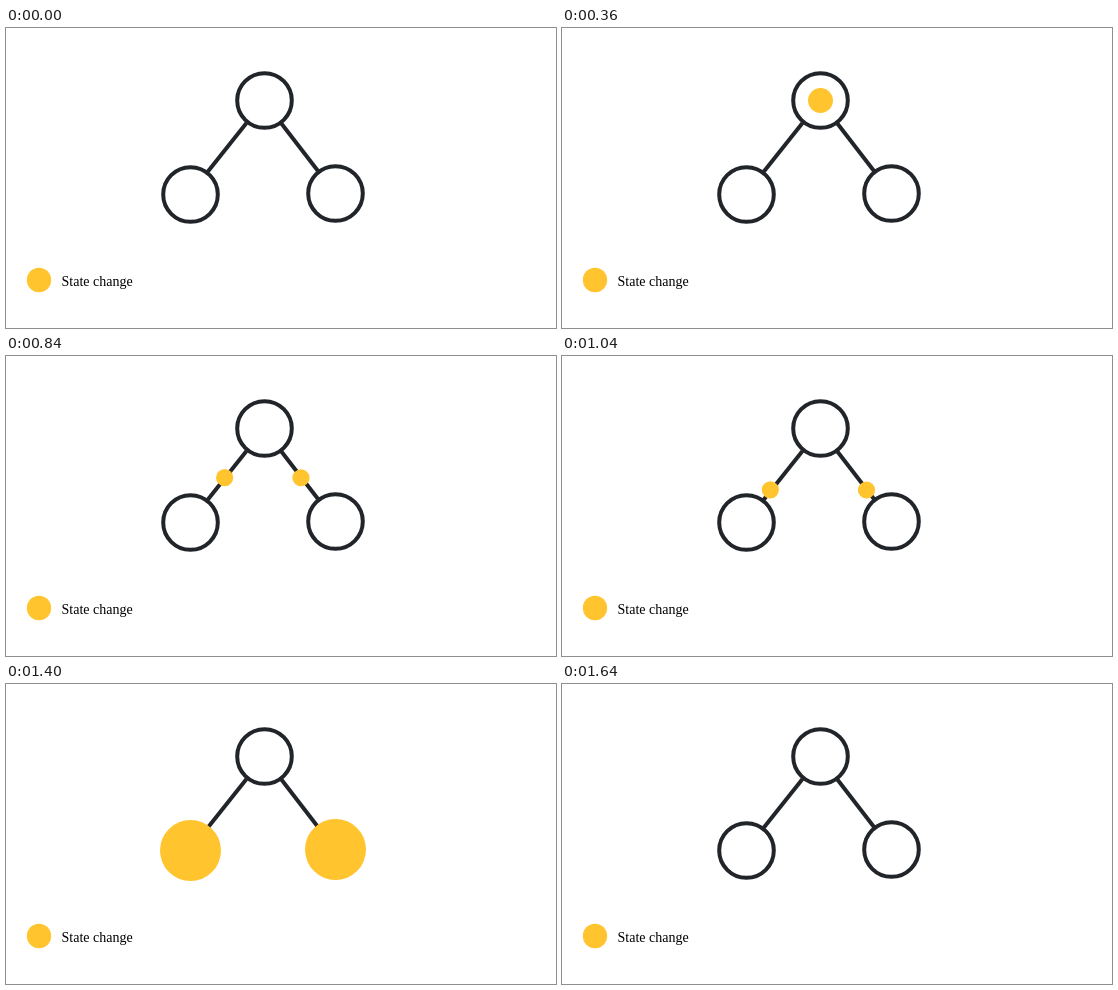
Animation of 550x300 px, one loop 2.28 s. Source, as an HTML page with a canvas:

```html
<!DOCTYPE html>
<html lang="en">
<head>
<meta charset="utf-8">
<title>State change</title>
<style>
  html, body { margin: 0; width: 100%; height: 100%; overflow: hidden; background: #fff; }
  canvas { display: block; }
</style>
</head>
<body>
<canvas id="stage" width="550" height="300"></canvas>
<script>
const ctx = document.getElementById('stage').getContext('2d');
const INK = '#212529';
const YELLOW = '#ffc42e';
const LOOP = 2280, STEP = 40, LAST_STEP = 1640;
const PULSE_RADIUS = 30.5, PULSE_TIME = 480;
const TRAVEL_START = 480, TRAVEL_END = 1120;

const root = { x: 258.5, y: 72.5 };
const leaves = [{ x: 184.5, y: 166.5 }, { x: 329.5, y: 165.5 }];
const edges = [[240.5, 95, 201.5, 144], [275, 95, 312, 143]];
const paths = [[237.2, 99.7, 204.2, 138.7], [277.8, 99.7, 308.3, 138.9]];

function disc(x, y, r) {
  ctx.fillStyle = YELLOW;
  ctx.beginPath();
  ctx.arc(x, y, r, 0, Math.PI * 2);
  ctx.fill();
}

function ring({ x, y }) {
  ctx.beginPath();
  ctx.arc(x, y, 27.3, 0, Math.PI * 2);
  ctx.stroke();
}

// Eased swell from nothing to full size and back
function pulse({ x, y }, elapsed) {
  if (elapsed <= 0 || elapsed >= PULSE_TIME) return;
  const size = (1 - Math.cos(2 * Math.PI * elapsed / PULSE_TIME)) / 2;
  disc(x, y, PULSE_RADIUS * size);
}

function draw(t) {
  ctx.fillStyle = '#fff';
  ctx.fillRect(0, 0, 550, 300);

  ctx.strokeStyle = INK;
  ctx.lineWidth = 4;
  for (const [x1, y1, x2, y2] of edges) {
    ctx.beginPath();
    ctx.moveTo(x1, y1);
    ctx.lineTo(x2, y2);
    ctx.stroke();
  }
  [root, ...leaves].forEach(ring);

  pulse(root, t + 14);
  if (t >= TRAVEL_START && t <= TRAVEL_END) {
    const p = (t - TRAVEL_START) / (TRAVEL_END - TRAVEL_START);
    for (const [x1, y1, x2, y2] of paths) {
      disc(x1 + (x2 - x1) * p, y1 + (y2 - y1) * p, 8.6);
    }
  }
  leaves.forEach(leaf => pulse(leaf, t - 1160));

  disc(33, 252, 12.2);
  ctx.fillStyle = '#000';
  ctx.font = '14px "Liberation Serif", Times, serif';
  ctx.fillText('State change', 55.5, 258);
}

const start = performance.now();
function tick() {
  const t = (performance.now() - start) % LOOP;
  draw(Math.min(Math.floor(t / STEP) * STEP, LAST_STEP));
  requestAnimationFrame(tick);
}
tick();
</script>
</body>
</html>
```
